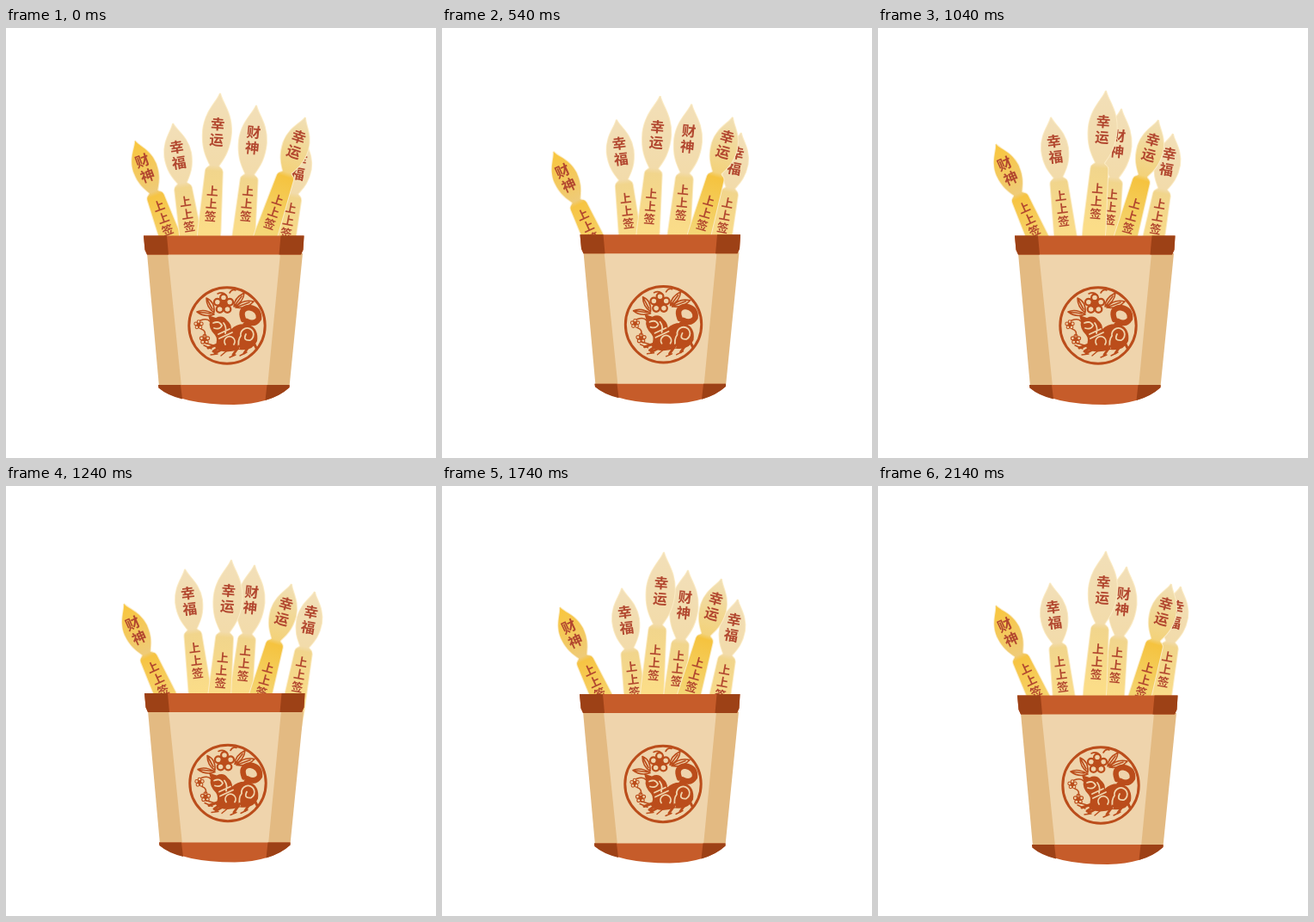
An HTML page for the animation above (2.24 s loop, 500x500 px).

```html
<!DOCTYPE html>
<html lang="zh">
<head>
<meta charset="utf-8">
<style>
  html, body { margin: 0; width: 100%; height: 100%; overflow: hidden; background: #fff; }
  svg { display: block; width: 100%; height: 100%; }
  text { font-family: "Noto Sans CJK SC", "Noto Sans CJK", sans-serif; font-weight: 700; fill: #b2472f; text-anchor: middle; }
  .ink { fill: #bb4d1b; stroke: none; }
  .line { fill: none; stroke: #bb4d1b; stroke-linecap: round; stroke-linejoin: round; }
  .cut { fill: none; stroke: #efd4ac; stroke-linecap: round; }
</style>
</head>
<body>
<svg viewBox="0 0 500 500">
  <defs id="defs"></defs>
  <g id="sticks"></g>
  <g id="cup">
    <path fill="#e3ba82" d="M164 262H345L329.500 417H178Z"/>
    <path fill="#efd4ac" d="M188 262H319L304 417H204Z"/>
    <path fill="#c65c2a" d="M160 241.500H346.500L345.500 258L343 263.500H164L161.500 258Z"/>
    <path fill="#9d4116" d="M160 241.500H187L189 263.500H164L161.500 258ZM319.500 241.500H346.500L345.500 258L343 263.500H317.500Z"/>
    <path fill="#c65c2a" d="M177 415H329.500V418Q308 437 265 438Q205 438 177.500 418.500Z"/>
    <path fill="#9d4116" d="M177 415H203L205 431.500Q187 427 177.500 418.500ZM303.500 415H329.500V418Q319 428 301.500 433Z"/>
    <g id="emblem">
      <circle class="line" cx="257" cy="346" r="44.200" stroke-width="3"/>
      <g class="line" stroke-width="1.600">
        <path d="M222 330Q231 326 242 333Q231 337 222 330L238 332M233 314Q243 318 242 331Q233 325 233 314L240 327M265 324Q265 314 277 308Q276 319 265 324L274 312M267 325Q275 315 288 318Q280 327 267 325L283 319M246 309Q252 306 256 311M260 308Q263 303 267 305"/>
        <path d="M227 350Q233 352 231 358M226 340Q234 337 237 341"/>
      </g>
      <g id="flowers"></g>
      <!-- tail -->
      <path class="line" stroke-width="6.500" d="M276 339Q271 326 283 325Q295 327 294 338Q289 346 280 341"/>
      <path class="line" stroke-width="3" d="M294 337Q291 347 277 344"/>
      <!-- body -->
      <path class="ink" d="M262 350Q270 342 283 345Q294 350 292 364Q287 376 271 374Q250 380 243 371Q247 362 243 357Q235 349 237 341L235 334L244 337Q252 333 257 340Q262 344 262 350Z"/>
      <path class="cut" stroke-width="1.800" d="M273 358A7.500 7.500 0 1 1 284 363Q275 364 279 356M255 368A6 6 0 1 1 265 368M241 343Q248 340 251 346Q249 351 242 349M253 343Q257 348 255 355M247 356L260 350M248 361L263 354M271 372Q269 363 273 358"/>
      <circle class="ink" cx="246" cy="345" r="2"/>
      <!-- legs and claws -->
      <path class="line" stroke-width="3" d="M249 367L235 372M256 371L243 378M271 370L264 380M284 368L277 378M247 372L241 376M288 366L291 372"/>
      <path class="line" stroke-width="1.400" d="M231 366L241 369M230 369L239 373M238 380L246 379M260 383L267 380M272 381L280 377M250 381L256 376"/>
    </g>
  </g>
</svg>
<script>
const NS = "http://www.w3.org/2000/svg";
const byId = id => document.getElementById(id);

function add(parent, tag, attrs, text) {
  const el = document.createElementNS(NS, tag);
  for (const k in attrs) el.setAttribute(k, attrs[k]);
  if (text) el.textContent = text;
  parent.append(el);
  return el;
}

function flower(x, y, r) {
  const g = byId("flowers");
  for (let i = 0; i < 5; i++) {
    const a = i * Math.PI * 0.4 - Math.PI / 2;
    add(g, "circle", { class: "line", cx: x + r * Math.cos(a), cy: y + r * Math.sin(a), r: r * 0.52, "stroke-width": r * 0.3 });
  }
  add(g, "circle", { class: "ink", cx: x, cy: y, r: r * 0.62 });
}
flower(253, 321, 7.5);
flower(224, 345, 3.5);
flower(231, 362, 3.8);

const pale = ["#f2dfb8", "#f2dbaa", "#f1d58c", "#fbdd88"];
const amber = ["#f9c63c", "#efcb78", "#f6c443", "#f6d87c"];
const honey = ["#f0dfb6", "#f3d27a", "#f5c33f", "#f4d676"];

// len: tip to neck; head, stem: distance of the first glyph from the tip
// pose: tip x, tip y, tilt at each key step
const keys = [0, 4, 8, 11, 13, 18, 22, 23];
const sticks = [
  { word: "幸福", len: 65, w: 14.5, head: 24, stem: 83, tone: pale,
    pose: [[347, 128, 11], [352, 117, 11], [346, 125, 11], [343, 123, 10.5], [359, 123, 10.5], [344, 132, 10.5], [352, 117, 10.5]] },
  { word: "财神", len: 80, w: 16, head: 31.5, stem: 100, tone: pale,
    pose: [[291, 90, 5.5], [282, 86, 6], [291, 99, 6], [283, 94, 6], [289, 92, 6], [286, 98, 6], [289, 94, 6]] },
  { word: "财神", len: 63, w: 14, head: 25, stem: 81, tone: amber,
    pose: [[150, 131, -20], [135, 132, -24.5], [129, 148, -25], [137, 135, -24], [137, 137, -24.5], [137, 141, -25], [137, 139, -25]] },
  { word: "幸福", len: 70, w: 15.5, head: 28, stem: 92, tone: pale,
    pose: [[194, 111, -9], [201, 97, -7], [207, 110, -7], [201, 104, -7], [208, 97, -7], [209, 119, -7], [200, 113, -7]] },
  { word: "幸运", len: 84, w: 16.5, head: 36, stem: 114, tone: pale,
    pose: [[249, 76, 4.5], [260, 74, 4.8], [250, 82, 4.5], [265, 73, 4.8], [262, 86, 5], [258, 77, 4.8], [265, 76, 4.5]] },
  { word: "幸运", len: 67, w: 15, head: 24, stem: 101, tone: honey,
    pose: [[348, 104, 18.5], [340, 103, 15.6], [333, 98, 15.6], [326, 107, 15.6], [332, 114, 15.6], [325, 108, 15.6], [341, 114, 15.6]] }
];
const cup = { el: byId("cup"),
  pose: [[0, 0, 0], [1, -1.5, 0], [1, 1, 0], [-1, 0, 0], [1, -0.5, 0], [0, 0.5, 0], [2, 2, 0]] };

function outline(len, w) {
  const side = s => `C${s * w * 0.15} ${len * 0.12} ${s * w * 0.95} ${len * 0.25} ${s * w} ${len * 0.53}` +
    `C${s * w} ${len * 0.78} ${s * w * 0.6} ${len * 0.9} ${s * 5} ${len}` +
    `C${s * 6} ${len + 3} ${s * 9.5} ${len + 2} ${s * 10} ${len + 7}L${s * 13} ${len + 75}V${len + 150}`;
  return `M0 0${side(1)}H0ZM0 0${side(-1)}H0Z`;
}

sticks.forEach((s, i) => {
  const end = s.len + 75;
  const fill = add(byId("defs"), "linearGradient", { id: "g" + i, gradientUnits: "userSpaceOnUse", x1: 0, y1: 0, x2: 0, y2: end });
  [0, s.len / end, s.len / end + 0.04, 1].forEach((offset, k) =>
    add(fill, "stop", { offset, "stop-color": s.tone[k] }));
  s.el = add(byId("sticks"), "g", {});
  const d = outline(s.len, s.w);
  add(s.el, "path", { d, fill: "none", stroke: "#fbebc4", "stroke-width": 2 });
  add(s.el, "path", { d, fill: `url(#g${i})` });
  [...s.word].forEach((c, k) => add(s.el, "text", { y: s.head + k * 18.3 + 6, "font-size": 16.5 }, c));
  [..."上上签"].forEach((c, k) => add(s.el, "text", { y: s.stem + k * 14.8 + 5, "font-size": 13.5 }, c));
});

function noise(n) {
  const v = Math.sin(n * 127.1 + 31.7) * 43758.5453;
  return (v - Math.floor(v)) * 2 - 1;
}

// Eased path between key poses, with a shake that fades out at each key
function place(part, step, seed, shake) {
  const k = keys.findLastIndex(v => v <= step);
  const a = part.pose[k], b = part.pose[(k + 1) % part.pose.length];
  const u = (step - keys[k]) / (keys[k + 1] - keys[k]);
  const wave = Math.sin(Math.PI * u);
  const [x, y, tilt] = a.map((v, i) =>
    v + (b[i] - v) * u + wave * shake[i] * noise(step * 17 + seed * 5 + i));
  part.el.setAttribute("transform", `translate(${x} ${y}) rotate(${tilt})`);
}

function draw() {
  const t = performance.now() % 2240;
  const step = t < 40 ? 0 : 1 + Math.floor((t - 40) / 100);
  sticks.forEach((s, i) => place(s, step, i + 1, [4, 6, 0.5]));
  place(cup, step, 0, [1, 1.5, 0]);
  requestAnimationFrame(draw);
}
draw();
</script>
</body>
</html>
```
